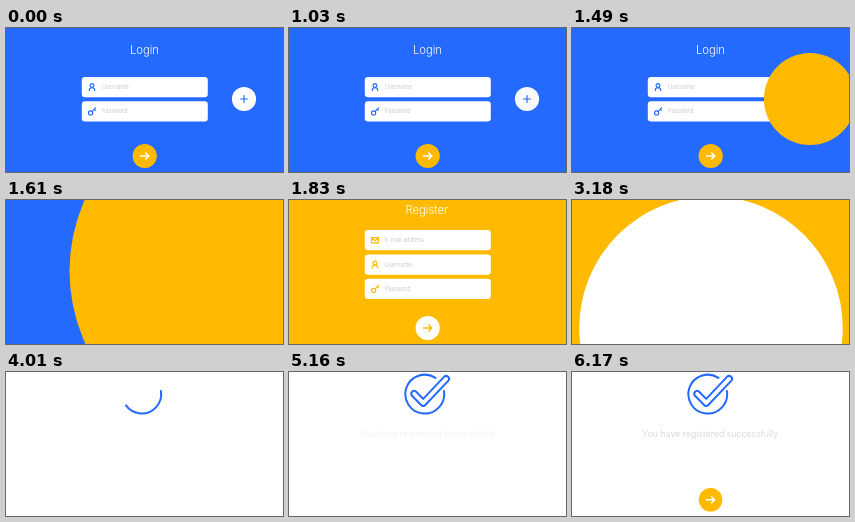
Animation of 277 by 144 pixels, one loop 6.8 s. Source, as an HTML page:

```html
<!DOCTYPE html>
<html lang="en">
<head>
<meta charset="utf-8">
<title>Login and register</title>
<style>
  html, body { margin: 0; width: 100%; height: 100%; overflow: hidden; background: #fff; }
  svg { display: block; width: 100vw; height: 100vh; font-family: Inter, "Liberation Sans", sans-serif; font-weight: 300; }
  .title { font-size: 11.25px; fill: #fff; text-anchor: middle; }
  .hint { font-size: 5.65px; fill: #b9bbc2; }
  .icon { fill: none; stroke-width: 1.15; stroke-linecap: round; stroke-linejoin: round; }
  .mark { fill: none; stroke: #2469ff; stroke-width: 2; stroke-linecap: round; stroke-linejoin: round; }
</style>
</head>
<body>
<svg id="stage" viewBox="0 0 277 144">
  <defs>
    <path id="user" d="M-1.9-1.6a1.9 1.9 0 1 0 3.8 0a1.9 1.9 0 1 0-3.8 0M-2.7 3.4V2.7Q-2.7 .5 0 .5T2.7 2.7V3.4"/>
    <path id="key" d="M-3.5 1.5a2.1 2.1 0 1 0 4.2 0a2.1 2.1 0 1 0-4.2 0M.2 0L3.6-3.5M2.3-2.2L3.4-1.1"/>
    <path id="mail" d="M-3.4-2.6H3.4V2.6H-3.4ZM-3.4-2.2L0 .5L3.4-2.2"/>
    <path id="arrow" d="M-4.2 0H4M1-3L4.1 0L1 3"/>
  </defs>

  <g id="login">
    <rect width="277" height="144" fill="#256aff"/>
    <text class="title" x="138.4" y="26.2">Login</text>
    <g id="loginFields"></g>
    <g transform="translate(138.7 128)">
      <circle r="12.1" fill="#ffba00"/>
      <use href="#arrow" class="icon" stroke="#fff" style="stroke-width:1.7"/>
    </g>
    <g transform="translate(238 71)">
      <circle id="plus" r="12.1" fill="#fff"/>
      <path class="icon" stroke="#2469ff" d="M-3.4 0H3.4M0-3.4V3.4"/>
    </g>
  </g>
  <circle id="yellow" cx="238" cy="71" fill="#ffba00"/>

  <g id="register">
    <rect width="277" height="144" fill="#ffba00"/>
    <text class="title" x="137.8" y="13.5">Register</text>
    <g id="registerFields"></g>
    <g transform="translate(138.7 128)">
      <circle id="send" r="12.1" fill="#fff"/>
      <use href="#arrow" class="icon" stroke="#ffba00" style="stroke-width:1.3"/>
    </g>
  </g>
  <circle id="white" cx="139" cy="128" fill="#fff"/>

  <g id="done">
    <rect width="277" height="144" fill="#fff"/>
    <path id="ring" class="mark" pathLength="1" d="M154.9 19A19.4 19.4 0 1 1 146.4 5.9"/>
    <path id="tick" class="mark" pathLength="1" d="M126.9 19.5L134.2 26.9L155 4.9A2.9 2.9 0 0 1 159.2 8.9L136.3 33A2.9 2.9 0 0 1 132.1 33L122.8 23.5A2.9 2.9 0 0 1 126.9 19.5"/>
    <text id="note" x="138.2" y="65.2" font-size="8.88" text-anchor="middle" fill="#cfcfd9">You have registered successfully</text>
    <g id="next">
      <circle r="11.8" fill="#ffba00"/>
      <use href="#arrow" class="icon" stroke="#fff" style="stroke-width:1.6"/>
    </g>
  </g>
</svg>
<script>
const LOOP = 6800;
const $ = id => document.getElementById(id);
const ramp = (t, from, to) => Math.min(1, Math.max(0, (t - from) / (to - from)));
const show = (id, on) => { $(id).style.display = on ? "" : "none"; };

function field(y, icon, label, color) {
  return `<rect x="75.8" y="${y}" width="126" height="20.3" rx="3.2" fill="#fff"/>
    <use href="#${icon}" class="icon" stroke="${color}" transform="translate(86 ${y + 10.2})"/>
    <text class="hint" x="95.8" y="${y + 12.1}">${label}</text>`;
}

$("loginFields").innerHTML =
  field(49, "user", "Username", "#2469ff") +
  field(73.2, "key", "Password", "#2469ff");
$("registerFields").innerHTML =
  field(30, "mail", "E-mail address", "#ffba00") +
  field(54.4, "user", "Username", "#ffba00") +
  field(78.7, "key", "Password", "#ffba00");

function trace(id, p) {
  show(id, p > 0);
  $(id).style.strokeDasharray = p < 1 ? `${p} 2` : "none";
}

function backOut(p) {
  const q = p - 1, s = 0.7;
  return 1 + (s + 1) * q ** 3 + s * q * q;
}

function draw(t) {
  show("login", t < 1830);
  show("yellow", t >= 1460 && t < 1830);
  show("register", t >= 1830 && t < 3300);
  show("white", t >= 3000 && t < 3300);
  show("done", t >= 3300);

  $("plus").setAttribute("fill-opacity", 1 - 0.2 * ramp(t, 1000, 1190));
  $("yellow").setAttribute("r", Math.max(0, 45 + 1.07 * (t - 1490)));
  $("send").setAttribute("fill-opacity", t < 2930 ? 1 : 0.8);
  $("white").setAttribute("r", Math.max(0, 12.1 + 0.661 * (t - 3000)));

  trace("ring", ramp(t, 3925, 4100));
  trace("tick", ramp(t, 4380, 4770));
  $("note").style.opacity = t < 5160 ? 0 : t < 5310 ? 0.35 : 1;

  const pop = ramp(t, 5560, 6170);
  show("next", pop > 0);
  $("next").setAttribute("transform", `translate(138.6 127.8) scale(${backOut(pop)})`);
}

const start = performance.now();
function loop() {
  draw((performance.now() - start) % LOOP);
  requestAnimationFrame(loop);
}
loop();
</script>
</body>
</html>
```
